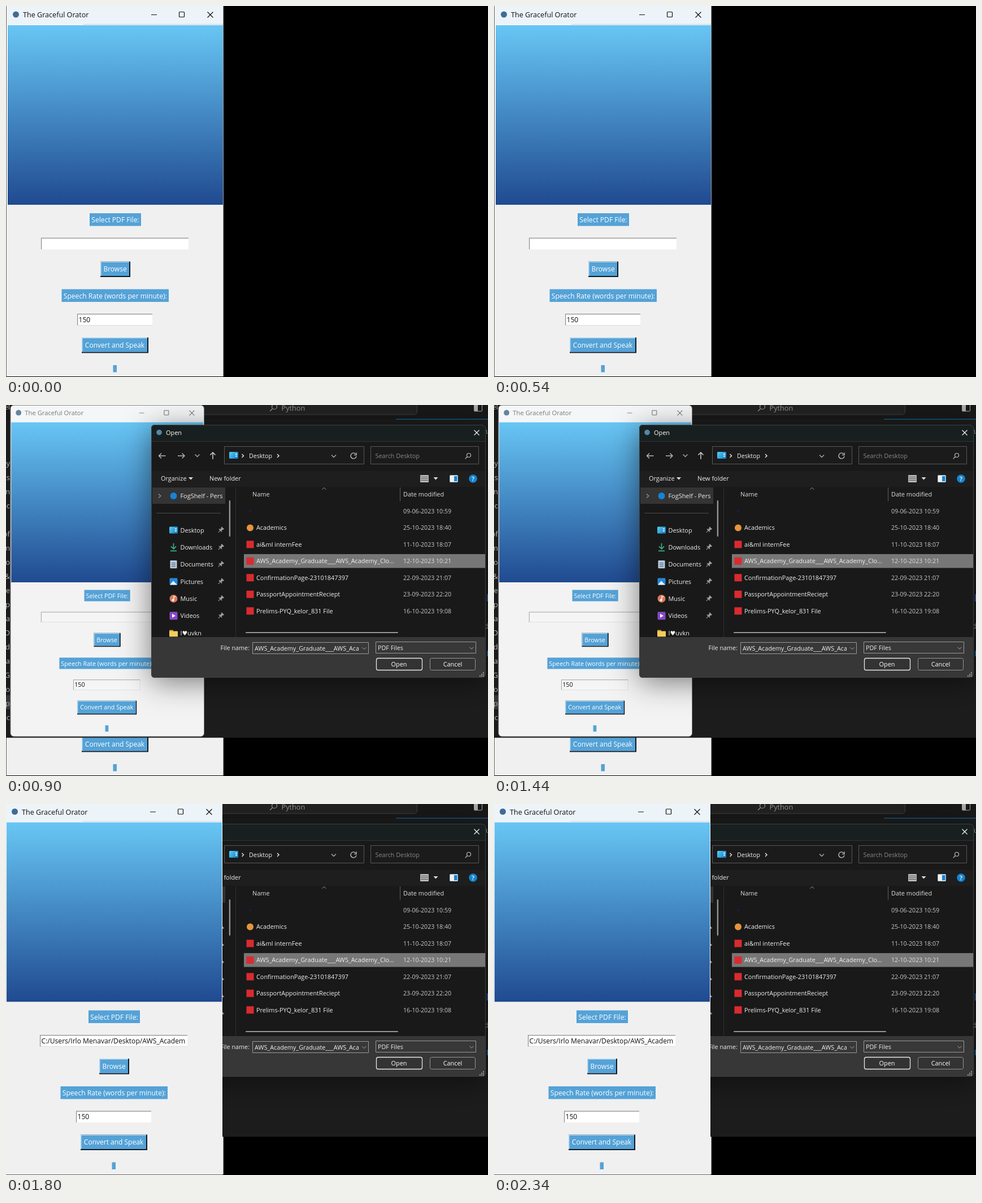
An HTML page with a canvas that plays this animation: 853x657 px, repeating every 2.7 s.

```html
<!DOCTYPE html>
<html lang="en">
<head>
<meta charset="utf-8">
<title>PDF reader demo</title>
<style>
html, body { margin: 0; width: 100%; height: 100%; overflow: hidden; background: #000; }
canvas { display: block; }
</style>
</head>
<body>
<canvas id="stage" width="853" height="657"></canvas>
<script>
const ctx = document.getElementById('stage').getContext('2d');
const HOLD = 900;
const APP_TITLE = 'The Graceful Orator';
const PDF_NAME = 'AWS_Academy_Graduate___AWS_Academy_Clo...';

function rect(x, y, w, h, color) {
  ctx.fillStyle = color;
  ctx.fillRect(x, y, w, h);
}

function round(x, y, w, h, r, fill, stroke, width = 1) {
  ctx.beginPath();
  ctx.roundRect(x, y, w, h, r);
  if (fill) { ctx.fillStyle = fill; ctx.fill(); }
  if (stroke) { ctx.strokeStyle = stroke; ctx.lineWidth = width; ctx.stroke(); }
}

function disc(x, y, r, color) {
  ctx.beginPath();
  ctx.arc(x, y, r, 0, Math.PI * 2);
  ctx.fillStyle = color;
  ctx.fill();
}

function ring(x, y, r, color, start = 0, end = Math.PI * 2) {
  ctx.beginPath();
  ctx.arc(x, y, r, start, end);
  ctx.strokeStyle = color;
  ctx.lineWidth = 1.2;
  ctx.stroke();
}

function line(points, color, width = 1) {
  ctx.beginPath();
  points.forEach(([x, y]) => ctx.lineTo(x, y));
  ctx.strokeStyle = color;
  ctx.lineWidth = width;
  ctx.stroke();
}

function polygon(points, color) {
  ctx.beginPath();
  points.forEach(([x, y]) => ctx.lineTo(x, y));
  ctx.fillStyle = color;
  ctx.fill();
}

function text(str, x, y, size, color, { align = 'left', weight = 400 } = {}) {
  ctx.font = `${weight} ${size}px "Open Sans", "Noto Sans", "DejaVu Sans", sans-serif`;
  ctx.textAlign = align;
  ctx.fillStyle = color;
  ctx.fillText(str, x, y);
}

function clipped(x, y, w, h, draw) {
  ctx.save();
  ctx.beginPath();
  ctx.rect(x, y, w, h);
  ctx.clip();
  draw();
  ctx.restore();
}

function chevron(x, y, dir, size, color, width = 1.2) {
  const s = size, h = size / 2;
  const shapes = {
    down: [[x - s, y - h], [x, y + h], [x + s, y - h]],
    up: [[x - s, y + h], [x, y - h], [x + s, y + h]],
    right: [[x - h, y - s], [x + h, y], [x - h, y + s]],
  };
  line(shapes[dir], color, width);
}

function arrow(x, y, angle, color) {
  ctx.save();
  ctx.translate(x, y);
  ctx.rotate(angle);
  line([[-6, 0], [6, 0]], color, 1.4);
  line([[1.5, -4.5], [6, 0], [1.5, 4.5]], color, 1.4);
  ctx.restore();
}

function magnifier(x, y, r, color, width = 1.2) {
  ring(x + 1, y - 1, r, color);
  line([[x + 1 - r * .7, y - 1 + r * .7], [x - r * 1.5, y + r * 1.5]], color, width);
}

function label(str, x, y, w) {
  rect(x, y, w, 22.5, '#54a2d7');
  text(str, x + w / 2, y + 16, 12.1, '#fff', { align: 'center' });
}

function button(str, x, y, w) {
  rect(x, y, w, 27.5, '#101820');
  rect(x, y, w - 2, 25.5, '#b5d9f2');
  rect(x + 1.5, y + 1.5, w - 3.5, 24, '#54a2d7');
  text(str, x + w / 2 - .5, y + 17.8, 12, '#fff', { align: 'center' });
}

function entry(str, x, y, w, fill, edge) {
  rect(x, y, w, 20.5, edge);
  rect(x + 1.2, y + 1.2, w - 1.2, 19.3, fill);
  clipped(x + 1, y, w - 2, 20, () => text(str, x + 2.5, y + 14.5, 12.1, '#111'));
}

function appWindow({ active = true, path = '' }) {
  const ink = active ? '#111' : '#777';
  const face = active ? '#f0f0f0' : '#f3f3f3';
  const field = active ? '#fff' : '#f5f5f5';
  const edge = active ? '#8a8a8a' : '#a8a8a8';
  rect(1, 0, 384, 656, face);
  rect(1, 0, 384, 34, active ? '#edf4f9' : '#f5f6f7');
  if (active) rect(137, 32, 247, 1, '#c9cdd0');
  disc(17.5, 15, 5.5, active ? '#3f6c94' : '#64849d');
  text(APP_TITLE, 30, 20, 12.6, ink);
  line([[257, 15.5], [267, 15.5]], ink);
  round(306.5, 10.5, 9, 9, 1, null, ink, 1.2);
  line([[356.5, 10.5], [366.5, 20.5]], ink, 1.2);
  line([[366.5, 10.5], [356.5, 20.5]], ink, 1.2);

  const sky = ctx.createLinearGradient(0, 34, 0, 352);
  sky.addColorStop(0, '#68c6f4');
  sky.addColorStop(.5, '#4388c3');
  sky.addColorStop(1, '#204a90');
  rect(1, 33, 384, 320, '#fbfbfb');
  rect(3, 34, 381, 318, sky);
  rect(1, 352, 384, 1.5, face);

  label('Select PDF File:', 148, 367, 91);
  entry(path, 62, 410.5, 261, field, edge);
  button('Browse', 167, 452.5, 53);
  label('Speech Rate (words per minute):', 98.5, 501.5, 189.5);
  entry('150', 126, 545, 133, field, edge);
  button('Convert and Speak', 134, 587, 118);
  rect(189.5, 636, 6.5, 12.5, '#54a2d7');
}

function editorBackdrop() {
  rect(0, 0, 853, 589.5, '#1c1c1c');
  rect(0, 0, 853, 25, '#181818');
  round(300.5, -20, 427, 37, 5, '#222', '#414141');
  magnifier(474, 4, 4.5, '#999');
  text('Python', 487.5, 9.5, 12.7, '#989898');
  round(828.5, -2, 14, 13, 1, null, '#aaa');
  rect(829, 0, 6, 11, '#aaa');
  rect(690, 24.5, 163, 1.2, '#1769a5');
  clipped(0, 0, 8, 589, () => {
    rect(0, 514, 8, 25, '#34373a');
    const scraps = 'el,,,,y,s,m,ic,,of,m,fo,&,e,.p,ba,D,d,Pa,G,o,.p,c'.split(',');
    scraps.forEach((s, i) => text(s, 7, 8 + i * 25, 13, '#b5b5b5', { align: 'right' }));
  });
  text('u', 849, 51, 12, '#999');
  rect(851, 335, 2, 13, '#3558a0');
  text('d', 847, 396, 12, '#999');
  rect(851, 435, 2, 10, '#1769a5');
}

function monitorIcon(x, y, w, h) {
  const g = ctx.createLinearGradient(x, y, x + w, y + h);
  g.addColorStop(0, '#55d0f5');
  g.addColorStop(1, '#1479c4');
  round(x, y, w, h, 1.5, g);
  rect(x + w - 5, y + 3, 3, 2, '#d8f4ff');
  rect(x + w - 5, y + 6.5, 3, 2, '#d8f4ff');
}

const placeIcons = [
  y => monitorIcon(289, y - 6, 15, 12),
  y => {
    line([[296.5, y - 7], [296.5, y + 3]], '#35b594', 1.6);
    line([[292, y - 1.5], [296.5, y + 3], [301, y - 1.5]], '#35b594', 1.6);
    line([[291, y + 6.5], [302, y + 6.5]], '#35b594', 1.6);
  },
  y => {
    round(290.5, y - 7, 12, 14, 1, '#b9cddd');
    [-3, 0, 3].forEach(d => rect(293, y + d, 7, 1.3, '#54728c'));
  },
  y => {
    round(289.5, y - 6, 14, 12, 1.5, '#2587d8');
    polygon([[290, y + 6], [296, y - 1], [303, y + 6]], '#e5f5ff');
  },
  y => {
    disc(296.5, y, 7, '#d9795b');
    disc(295.5, y + 2.5, 2, '#fff');
    line([[297, y + 2], [297, y - 4], [300, y - 3]], '#fff', 1.3);
  },
  y => {
    round(289.5, y - 7, 14, 14, 1.5, '#8548c8');
    polygon([[294, y - 3.5], [294, y + 3.5], [300, y]], '#fff');
  },
  y => {
    round(289, y - 5, 7, 5, 1, '#d9a02d');
    round(289, y - 3, 15, 10, 1, '#f5cc5d');
  },
];

function pin(x, y) {
  ctx.save();
  ctx.translate(x, y);
  ctx.rotate(Math.PI / 4);
  rect(-3, -5.5, 6, 1.8, '#a3a3a3');
  rect(-1.8, -4, 3.6, 4, '#a3a3a3');
  rect(-3.5, 0, 7, 1.5, '#a3a3a3');
  rect(-.5, 1, 1, 5, '#a3a3a3');
  ctx.restore();
}

function sidebar() {
  rect(259, 146, 129, 29, '#343434');
  chevron(272, 161, 'right', 3.5, '#999');
  disc(296.5, 161, 6, '#1583d6');
  clipped(300, 146, 87, 29, () => text('FogShelf - Pers', 308.5, 164.5, 10.9, '#eee'));
  rect(266, 191, 114, 1, '#4a4a4a');
  clipped(258, 195, 148, 215.5, () => {
    ['Desktop', 'Downloads', 'Documents', 'Pictures', 'Music', 'Videos', 'I♥uvkn'].forEach((name, i) => {
      const y = 221.5 + i * 30.35;
      placeIcons[i](y);
      text(name, 308.5, y + 4, 10.9, '#eee');
      if (i < 6) pin(380, y);
    });
  });
  round(394.7, 169, 2.4, 64, 1, '#969696');
  rect(406, 146, 1, 265, '#303030');
}

function fileList() {
  const rows = [
    ['', '09-06-2023 10:59'],
    ['Academics', '25-10-2023 18:40'],
    ['ai&ml internFee', '11-10-2023 18:07'],
    [PDF_NAME, '12-10-2023 10:21'],
    ['ConfirmationPage-23101847397', '22-09-2023 21:07'],
    ['PassportAppointmentReciept', '23-09-2023 22:20'],
    ['Prelims-PYQ_kelor_831 File', '16-10-2023 19:08'],
  ];
  text('Name', 436, 161.5, 10.9, '#ddd');
  text('Date modified', 703, 161.5, 10.9, '#ddd');
  chevron(563, 148, 'up', 3.5, '#999', 1);
  rect(697, 146, 1, 24, '#606060');
  rows.forEach(([name, date], i) => {
    const y = 188 + i * 29.45;
    if (i === 3) rect(421, y - 12.3, 427.5, 24.5, '#777');
    if (i === 0) disc(432, y, 2, '#1b1b50');
    if (i === 1) disc(432, y, 6, '#e7953c');
    if (i > 1) rect(425.5, y - 6.5, 13, 13, '#d92b2f');
    text(name, 443, y + 3.8, 10.85, '#f0f0f0');
    text(date, 703, y + 3.8, 10.6, i === 3 ? '#ddd' : '#c8c8c8');
  });
  round(424, 402, 270, 2, 1, '#969696');
}

function toolbar() {
  const ink = '#ddd';
  arrow(276.5, 90, Math.PI, '#bbb');
  arrow(310, 90, 0, '#bbb');
  chevron(338.5, 89.5, 'down', 4, '#aaa', 1.4);
  arrow(366, 90, -Math.PI / 2, ink);
  round(386.5, 73.5, 247, 31, 0, '#1b1b1b', '#585858');
  monitorIcon(395, 83, 16, 12);
  chevron(419, 90, 'right', 3, ink, 1.5);
  text('Desktop', 430, 93.5, 10.6, '#f2f2f2', { weight: 500 });
  chevron(481.5, 90, 'right', 3, ink, 1.5);
  chevron(580, 90.5, 'down', 4, '#aaa', 1.4);
  ring(615, 90, 5, ink, .1, Math.PI * 1.75);
  line([[620, 84.5], [620, 88.5], [616, 88.5]], ink, 1.2);
  round(645.5, 73.5, 191, 31, 0, '#1b1b1b', '#585858');
  text('Search Desktop', 653.5, 93.5, 10.8, '#888');
  magnifier(818, 90, 3.5, '#bbb');

  text('Organize', 274, 134, 10.9, '#eee');
  polygon([[323, 128], [331, 128], [327, 132.5]], ink);
  text('New folder', 360, 134, 10.9, '#eee');
  round(733, 124, 15, 13, 1, '#b8b8b8');
  [127, 130, 133].forEach(y => rect(734, y, 13, 1, '#555'));
  polygon([[756.5, 128], [764.5, 128], [760.5, 132.5]], ink);
  round(785.5, 124.5, 14, 12, 1, '#f0f0f0', '#9db4c5');
  rect(793, 126, 5.5, 9, '#1684d3');
  disc(826.5, 130.5, 7.3, '#1583cf');
  text('?', 826.5, 134.5, 11, '#fff', { align: 'center', weight: 600 });
}

function footer() {
  round(257, 411, 592, 72, [0, 0, 6, 6], '#373737');
  text('File name:', 431, 434, 10.8, '#eee', { align: 'right' });
  round(436.5, 420.5, 205, 20, 0, '#383838', '#9a9a9a');
  clipped(437, 421, 187, 19, () => text(PDF_NAME, 440, 434.5, 10.8, '#f0f0f0'));
  chevron(634, 431, 'down', 3.5, '#aaa', 1);
  round(654.5, 419.5, 177, 20, 0, '#383838', '#9a9a9a');
  text('PDF Files', 658, 434, 10.8, '#eee');
  chevron(824, 430.5, 'down', 3.5, '#aaa', 1);
  round(655.5, 448.5, 81, 21, 3, '#333', '#e8e8e8', 1.3);
  text('Open', 695.5, 462.8, 10.9, '#fff', { align: 'center' });
  round(750.5, 448.5, 80, 21, 3, '#333', '#969696');
  text('Cancel', 790.5, 462.8, 10.9, '#fff', { align: 'center' });
  for (let i = 0; i < 3; i++) {
    for (let j = 0; j <= i; j++) rect(844 - j * 3, 473 + i * 3, 1.7, 1.7, '#bbb');
  }
}

function openDialog() {
  ctx.save();
  ctx.shadowColor = 'rgba(0,0,0,.5)';
  ctx.shadowBlur = 52;
  ctx.shadowOffsetY = 8;
  round(257, 35, 592, 448, 6, '#191919');
  ctx.restore();
  round(257, 35, 592, 30, [6, 6, 0, 0], '#18201f');
  rect(257, 64, 592, 1, '#303535');
  rect(257, 117, 592, 28, '#1e1e1e');
  disc(271, 48.5, 4.8, '#5386ad');
  text('Open', 283, 52.8, 10.9, '#fff');
  line([[828.5, 44.5], [837.5, 53.5]], '#eee', 1.2);
  line([[837.5, 44.5], [828.5, 53.5]], '#eee', 1.2);
  toolbar();
  sidebar();
  fileList();
  footer();
  round(257.5, 35.5, 591, 447, 6, null, '#3c4040');
}

function startScene() {
  rect(0, 0, 853, 657, '#000');
  rect(0, 0, 1, 657, '#606060');
  appWindow({});
  rect(384, 0, 1, 656, '#a0a0a0');
}

function pickScene() {
  clipped(0, 0, 853, 589.5, () => {
    editorBackdrop();
    ctx.save();
    ctx.beginPath();
    ctx.roundRect(8, .5, 342.5, 586.5, 6);
    ctx.clip();
    rect(8, 0, 343, 587, '#f3f3f3');
    ctx.translate(6.6, .3);
    ctx.scale(.8915, .8915);
    appWindow({ active: false });
    ctx.restore();
    round(8, .5, 342.5, 586.5, 6, null, '#888');
    openDialog();
  });
}

function chosenScene() {
  clipped(0, 0, 383, 657, () => {
    rect(0, 0, 383, 4, '#edf4f9');
    rect(0, 650, 383, 6, '#f0f0f0');
    rect(0, 656, 383, 1, '#666');
    ctx.translate(-2, -1.5);
    appWindow({ path: 'C:/Users/Irlo Menavar/Desktop/AWS_Academ' });
  });
}

const scenes = [startScene, pickScene, chosenScene];

// Each scene is painted over the earlier ones, so their uncovered parts stay visible.
function render(now) {
  const step = Math.floor(now / HOLD) % scenes.length;
  scenes.slice(0, step + 1).forEach(draw => draw());
}

const start = performance.now();
function tick() {
  render(performance.now() - start);
  requestAnimationFrame(tick);
}
tick();
</script>
</body>
</html>
```
